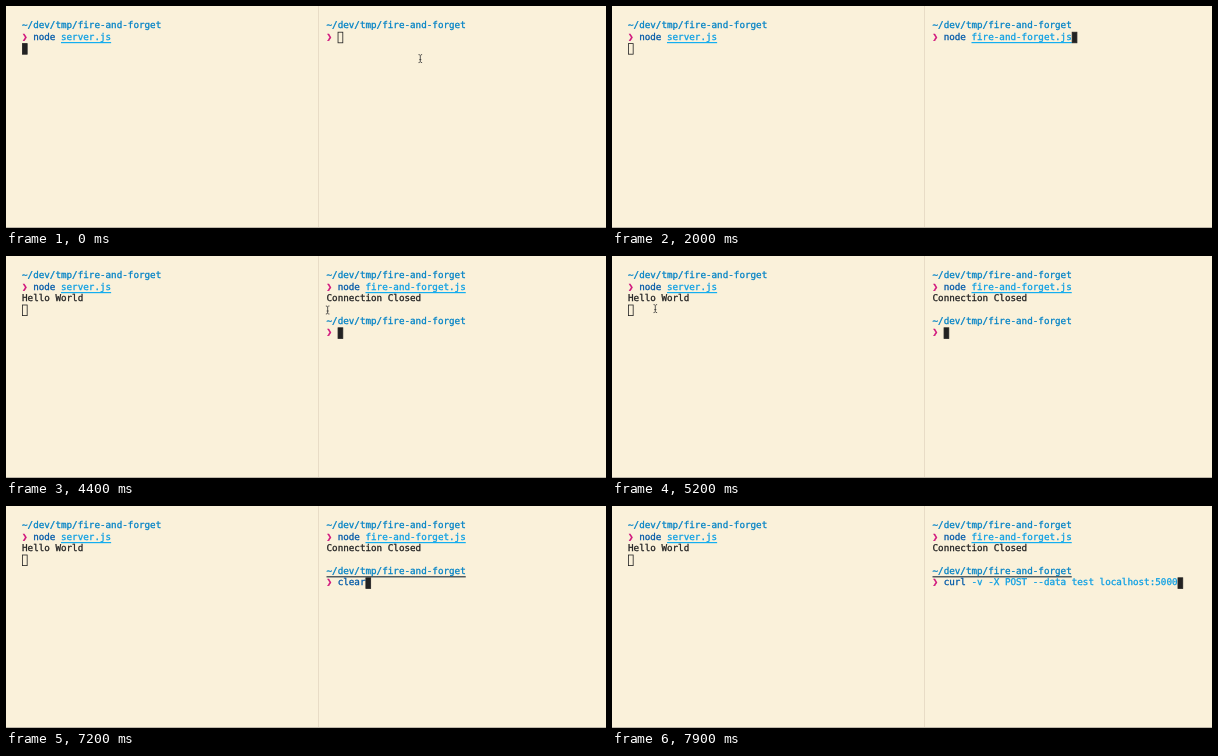
An HTML page that plays this animation: 600 px wide and 222 px high, repeating every 8 s.

```html
<!DOCTYPE html>
<html lang="en">
<head>
<meta charset="utf-8">
<title>Fire and forget</title>
<style>
  html, body { margin: 0; width: 100%; height: 100%; overflow: hidden; background: #faf1da; }
  svg { display: block; width: 100vw; height: 100vh; }
  text {
    font: 9.25px "DejaVu Sans Mono", "Liberation Mono", monospace;
    white-space: pre;
    text-rendering: geometricPrecision;
    stroke-width: 0.3px;
  }
</style>
</head>
<body>
<svg id="stage" viewBox="0 0 600 222"></svg>
<script>
const LOOP = 8000;
const CHAR = 5.57, ROW = 11.4, TOP = 14.4;
const LEFT = 16, RIGHT = 320.5;
const COLOR = {
  path: '#0082c6', prompt: '#d0107a', command: '#0059a8', arg: '#0c9fe4',
  line: '#12aef0', ink: '#222'
};
const DIR = '~/dev/tmp/fire-and-forget';
const stage = document.getElementById('stage');

function add(tag, attrs, parent = stage) {
  const el = document.createElementNS('http://www.w3.org/2000/svg', tag);
  for (const key in attrs) el.setAttribute(key, attrs[key]);
  return parent.appendChild(el);
}

const group = () => add('g', {});
const show = (el, on) => el.setAttribute('visibility', on ? 'visible' : 'hidden');

function write(x, row, col, text, fill, parent) {
  const el = add('text', {
    x: x + col * CHAR, y: TOP + row * ROW + 8, fill, stroke: fill
  }, parent);
  el.textContent = text;
  return el;
}

function underline(x, row, col, length, fill, parent) {
  add('rect', {
    x: x + col * CHAR, y: TOP + row * ROW + 10.2,
    width: length * CHAR, height: 1.2, fill
  }, parent);
}

function prompt(x, row, parent) {
  write(x, row, 0, DIR, COLOR.path, parent);
  write(x, row + 1, 0, '❯', COLOR.prompt, parent);
}

function nodeCommand(x, file, parent) {
  write(x, 1, 2, 'node', COLOR.command, parent);
  write(x, 1, 7, file, COLOR.arg, parent);
  underline(x, 1, 7, file.length, COLOR.line, parent);
}

function caret() {
  const line = 0.8;
  const el = add('rect', {
    width: CHAR - line, height: ROW - line, stroke: COLOR.ink, 'stroke-width': line
  });
  return (x, row, col, solid) => {
    el.setAttribute('x', x + col * CHAR + line / 2);
    el.setAttribute('y', TOP + row * ROW + line / 2);
    el.setAttribute('fill', solid ? COLOR.ink : 'none');
  };
}

add('rect', { width: 600, height: 222, fill: '#faf1da' });
add('rect', { x: 312, y: 0, width: 1, height: 221, fill: '#e8dcc6' });
add('rect', { x: 0, y: 221, width: 600, height: 1, fill: '#bfb8aa' });

// Left pane
prompt(LEFT, 0);
nodeCommand(LEFT, 'server.js');
const hello = write(LEFT, 2, 0, 'Hello World', COLOR.ink);

// Right pane
prompt(RIGHT, 0);
const firstKey = write(RIGHT, 1, 2, 'n', COLOR.command);
const nodeRun = group();
nodeCommand(RIGHT, 'fire-and-forget.js', nodeRun);
const closed = write(RIGHT, 2, 0, 'Connection Closed', COLOR.ink);
const nextPrompt = group();
prompt(RIGHT, 4, nextPrompt);
const pathLine = group();
underline(RIGHT, 4, 0, DIR.length, '#2b3a44', pathLine);
const command = write(RIGHT, 5, 2, '', COLOR.command);
const args = write(RIGHT, 5, 7, '', COLOR.arg);

const leftCaret = caret();
const rightCaret = caret();

const pointer = add('path', {
  d: 'M-1.8-4Q-.3-4 0-3.2Q.3-4 1.8-4M0-3.2V3.2M-1.8 4Q-.3 4 0 3.2Q.3 4 1.8 4M-1 1H1',
  fill: 'none', stroke: '#333', 'stroke-width': 0.8
});

// Pointer path after it reappears: time, x, y
const TRAIL = [
  [4200, 414.3, 52.6], [4800, 60, 58], [5000, 43.3, 52.6], [5400, 43.3, 52.6],
  [5700, 50, 58], [6200, 50, 58]
];

function pointerAt(t) {
  if (t < 700) return [414.3, 52.6];
  if (t < TRAIL[0][0] || t >= TRAIL[TRAIL.length - 1][0]) return null;
  const i = TRAIL.findIndex(p => p[0] > t);
  const [t0, x0, y0] = TRAIL[i - 1], [t1, x1, y1] = TRAIL[i];
  const u = (t - t0) / (t1 - t0), ease = u * u * (3 - 2 * u);
  return [x0 + (x1 - x0) * ease, y0 + (y1 - y0) * ease];
}

function typedAt(t) {
  if (t < 6800) return ['', ''];
  if (t < 7000) return ['c', ''];
  if (t < 7400) return ['clear', ''];
  return ['curl', '-v -X POST --data test localhost:5000'];
}

function placeRightCaret(t, typed) {
  const solid = t >= 100;
  if (t < 700) rightCaret(RIGHT, 1, 2, solid);
  else if (t < 1000) rightCaret(RIGHT, 1, 3, solid);
  else if (t < 3000) rightCaret(RIGHT, 1, 25, solid);
  else if (t < 3100) rightCaret(RIGHT, 2, 0, solid);
  else {
    const [word, rest] = typed;
    rightCaret(RIGHT, 5, 2 + word.length + (rest ? rest.length + 1 : 0), solid);
  }
}

function draw(t) {
  const greeted = t >= 4000, typed = typedAt(t), spot = pointerAt(t);
  show(hello, greeted);
  show(firstKey, t >= 700 && t < 1000);
  show(nodeRun, t >= 1000);
  show(closed, t >= 3100);
  show(nextPrompt, t >= 3100);
  show(pathLine, t >= 7000);
  command.textContent = typed[0];
  args.textContent = typed[1];
  leftCaret(LEFT, greeted ? 3 : 2, 0, t < 100);
  placeRightCaret(t, typed);
  show(pointer, spot);
  if (spot) pointer.setAttribute('transform', `translate(${spot[0]} ${spot[1]})`);
}

const start = performance.now();
function tick() {
  draw((performance.now() - start) % LOOP);
  requestAnimationFrame(tick);
}
tick();
</script>
</body>
</html>
```
